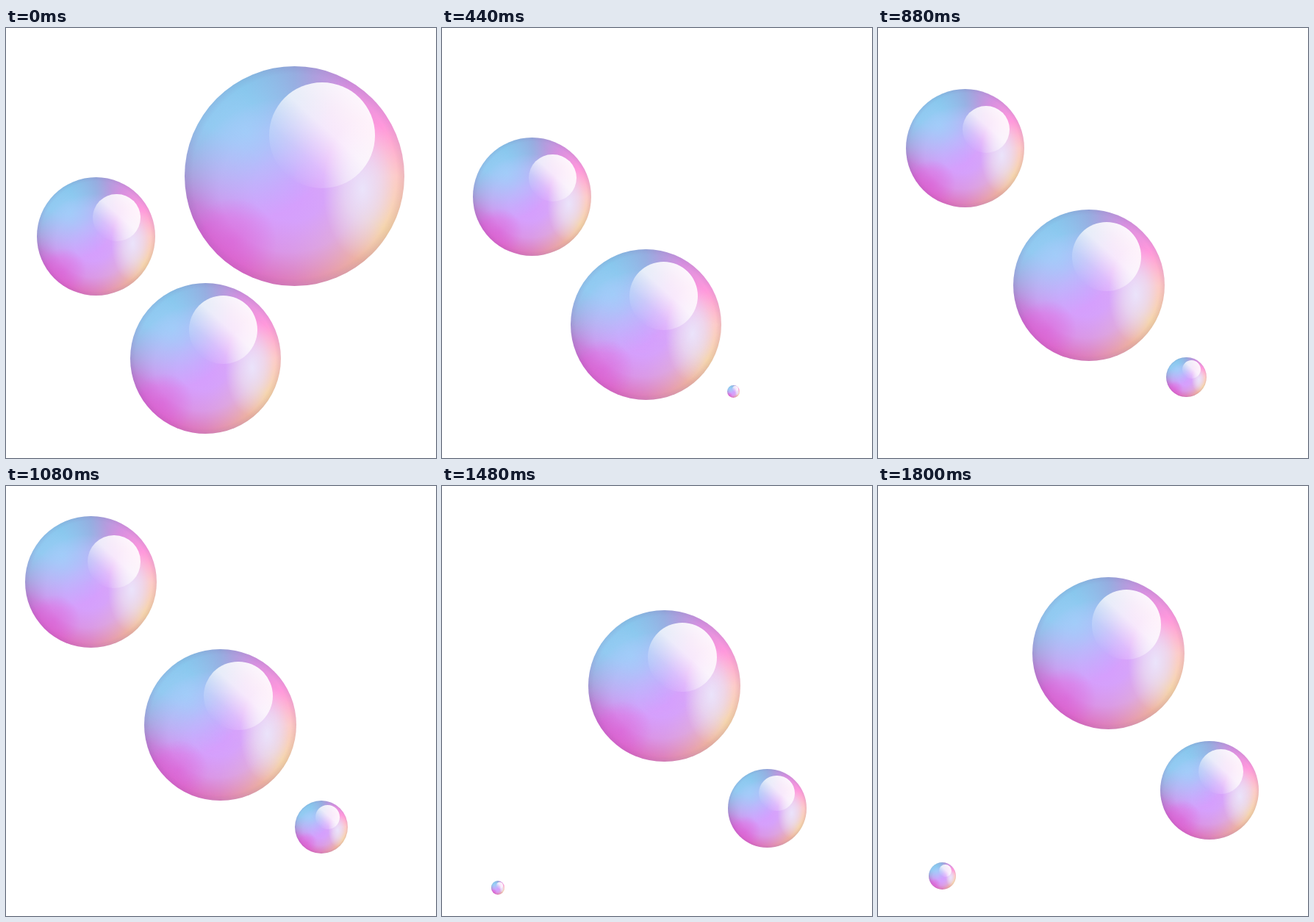
An HTML page for the animation above (1.84 s loop, 585 px wide and 585 px high).

```html
<!DOCTYPE html>
<html lang="en">
<head>
<meta charset="utf-8">
<title>Bubbles</title>
<style>
html, body { margin: 0; width: 100%; height: 100%; overflow: hidden; background: #fff; }
.bubble {
  --shine: 39% 8.3%; --size: 45.5%;
  position: absolute;
  border-radius: 50%;
  overflow: hidden;
  /* top to bottom: rim shade, pale right, magenta foot, blue shoulder, violet core, rim colours */
  background:
    radial-gradient(closest-side, transparent 93%, rgba(125, 105, 170, .14)),
    radial-gradient(18% 32% at 81% 56%, rgba(235, 230, 252, .95), rgba(235, 230, 252, .6) 45%, transparent),
    radial-gradient(circle closest-side at 22% 80%, rgba(222, 92, 214, .5), transparent),
    radial-gradient(40% 40% at 28% 30%, rgba(160, 208, 250, .85), rgba(163, 205, 250, .45) 50%, transparent),
    radial-gradient(47% 42% at 48% 56%, #d49eff, rgba(213, 162, 255, .95) 35%, rgba(216, 168, 255, .65) 68%, transparent),
    conic-gradient(#94a8dc, #d690e0, #ff98dc, #ffc6c0, #fad090, #eaa8a4, #de80b8,
      #dc62c2, #d060cc, #a898d6, #82c6e8, #72c2e2, #94a8dc);
}
.bubble::after {
  content: "";
  position: absolute;
  left: var(--x); top: var(--y);
  width: var(--size); height: var(--size);
  border-radius: 50%;
  background: linear-gradient(222deg, rgba(255, 255, 255, .94) 10%, rgba(255, 255, 255, .76) 45%,
    rgba(255, 255, 255, .25) 68%, transparent 86%);
}
.bubble { --x: 39%; --y: 8.3%; }
.large { --x: 38.7%; --y: 7.4%; --size: 48%; }
.left { --x: 47.5%; --y: 14.5%; --size: 40%; }
</style>
</head>
<body>
<script>
const LOOP = 1840, STEP = 40, SWELL_TIME = 100;

// life: first and last moment; x, y: start, middle and end of a curved path;
// r: start and end radius; swell: growth just before the pop
const bubbles = [
  { kind: "large", life: [40, 200], x: [392, 392, 392], y: [201.5, 193, 184], r: [149.5, 149.5], swell: 7.5 },
  { kind: "left", life: [40, 1120], x: [122.5, 121.5, 115], y: [283, 209, 124], r: [80.5, 80.5], swell: 14.5 },
  { kind: "middle", life: [40, 1800], x: [271.3, 287.5, 313.3], y: [449.3, 345, 227.8], r: [102.5, 103.5], swell: 0 },
  { kind: "right", life: [280, 1800], x: [387, 427, 451], y: [500, 466.3, 414], r: [1.5, 67.2], swell: 0 },
  { kind: "small", life: [1240, 1800], x: [62.5, 78, 87.5], y: [556.5, 545, 530.4], r: [2.5, 18.5], swell: 0 }
];

for (const b of bubbles) {
  b.el = document.body.appendChild(document.createElement("div"));
  b.el.className = "bubble " + b.kind;
}

// Parabola through a at p = 0, m at p = 1/2 and b at p = 1
const curve = ([a, m, b], p) => a + (4 * m - 3 * a - b) * p + 2 * (a + b - 2 * m) * p * p;

function draw(now) {
  const t = Math.max(STEP, Math.floor(now % LOOP / STEP) * STEP);
  for (const { el, life: [born, end], x, y, r, swell } of bubbles) {
    el.hidden = t < born || t > end;
    if (el.hidden) continue;
    const p = (t - born) / (end - born);
    const puff = swell * Math.max(0, 1 - (end - t) / SWELL_TIME);
    const radius = r[0] + (r[1] - r[0]) * p + puff;
    el.style.left = curve(x, p) - radius + "px";
    el.style.top = curve(y, p) - radius + "px";
    el.style.width = el.style.height = 2 * radius + "px";
  }
}

const start = performance.now();
function tick() {
  draw(performance.now() - start);
  requestAnimationFrame(tick);
}
tick();
</script>
</body>
</html>
```
